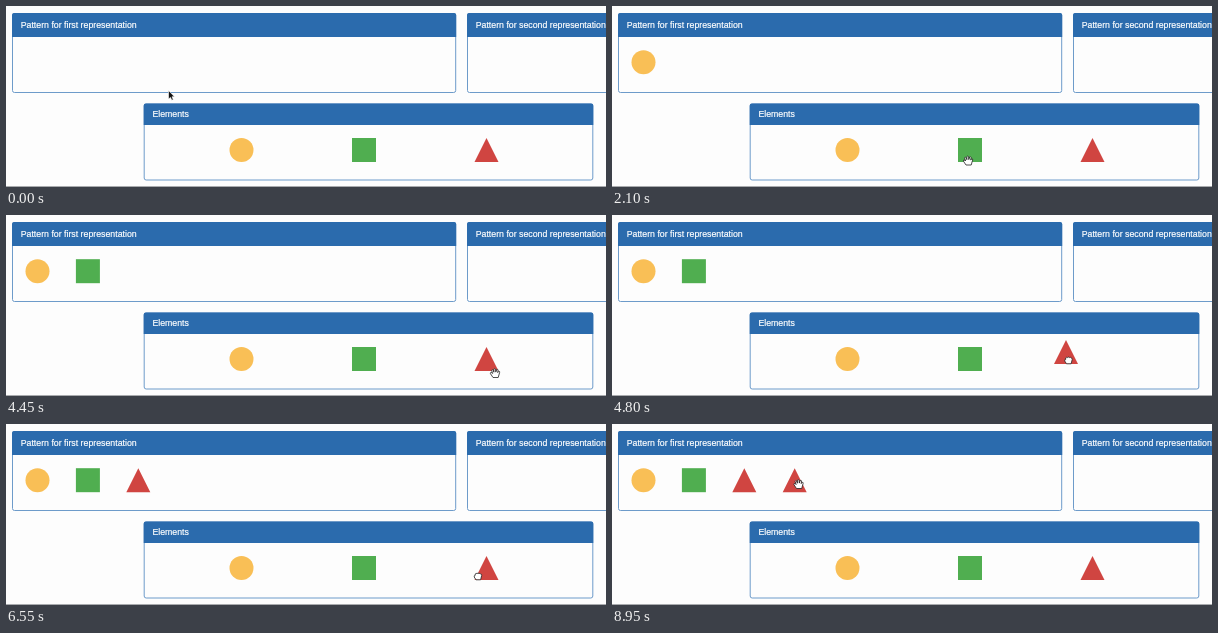
An HTML page that plays this animation: 600x181 px, repeating every 9000 ms.

```html
<!DOCTYPE html>
<html lang="en">
<head>
<meta charset="utf-8">
<title>Drag elements into a pattern</title>
<style>
  html, body { margin: 0; width: 100%; height: 100%; overflow: hidden; background: #fdfdfd; }
  svg { display: block; width: 100%; height: 100%; }
  text { font: 8.77px "Liberation Sans", Arial, sans-serif; fill: #fff; stroke: #fff; stroke-width: .2; }
  .body { fill: #fdfdfd; stroke: #6d9bca; }
  .body.over { fill: #89cee7; }
  .head { fill: #2b6bad; }
  .hand { fill: #fff; stroke: #222; stroke-width: .8; stroke-linejoin: round; }
</style>
</head>
<body>
<svg id="stage" viewBox="0 0 600 181">
  <defs>
    <circle id="circle" r="12" fill="#f9bf56"/>
    <rect id="square" x="-12" y="-12" width="24" height="24" fill="#50ae50"/>
    <path id="triangle" d="M0-12L12 12H-12Z" fill="#d04541"/>
    <path id="arrow" d="M0 0V8.6L2 6.9L3.3 9.8L4.8 9.1L3.5 6.3H6Z" fill="#111" stroke="#fff" stroke-width=".6"/>
    <path id="open" class="hand" d="M-2 4.5L-4.6.6Q-4.8-1-3.2-.3L-2.4.5L-3.4-2.7Q-2.8-4-1.9-2.9L-1.1-.8V-3.9Q-.2-5 .6-3.9L.8-.9L1.7-3.5Q2.7-4.2 3.1-3L2.7-.4L3.8-1.7Q5-1.8 4.6-.4L3.2 4.5Z"/>
    <path id="fist" class="hand" d="M-2 3.8L-3.8 1Q-4-.8-2.8-.6V-2Q-2-3.2-1-2.4Q0-3.5 1-2.4Q2-3.1 2.7-2Q3.9-1.9 3.7-.5L2.6 3.8Z"/>
  </defs>
  <rect y="180" width="600" height="1" fill="#a9abae"/>
</svg>
<script>
const LOOP = 9000, STEP = 50;
const CARRY = 800;   // time to bring a piece into the pattern
const SETTLE = 150;  // time from release until the highlight clears
const PATTERN_BOTTOM = 87;
const stage = document.getElementById("stage");

function add(tag, attrs) {
  const node = document.createElementNS("http://www.w3.org/2000/svg", tag);
  for (const name in attrs) node.setAttribute(name, attrs[name]);
  return stage.appendChild(node);
}

function addPanel(x, y, width, height, headHeight, title) {
  const body = add("rect", { class: "body", x: x + .5, y: y + .5, width: width - 1, height: height - 1, rx: 2 });
  const r = 2;
  add("path", {
    class: "head",
    d: `M${x} ${y + headHeight}v${r - headHeight}q0-${r} ${r}-${r}h${width - 2 * r}q${r} 0 ${r} ${r}v${headHeight - r}z`
  });
  add("text", { x: x + 8.7, y: y + headHeight / 2 + 3.1 }).textContent = title;
  return body;
}

function place(node, [x, y]) {
  node.setAttribute("transform", `translate(${x} ${y})`);
}

function addPiece(shape, position) {
  const node = add("use", { href: "#" + shape });
  place(node, position);
  return node;
}

const show = (node, visible) => node.setAttribute("visibility", visible ? "visible" : "hidden");

const firstPattern = addPanel(6, 7, 444.2, 80, 24, "Pattern for first representation");
addPanel(461, 7, 444.2, 80, 24, "Pattern for second representation");
addPanel(137.7, 97.5, 449.6, 77, 21.5, "Elements");

const homes = {};
["circle", "square", "triangle"].forEach((shape, i) => {
  const position = [235.5 + 122.5 * i, 144];
  homes[shape] = { position, node: addPiece(shape, position) };
});

// The pointer hovers a piece, grabs it, carries it to a point and drops it there.
const start = [162.5, 84.5];
const drags = [
  { shape: "circle", hoverAt: 300, hover: [235, 148], grabAt: 350, grab: [235, 148], dropAt: 1300, drop: [160, 62] },
  { shape: "square", hoverAt: 2100, hover: [356, 154.5], grabAt: 2500, grab: [345, 137], dropAt: 3750, drop: [151, 51] },
  { shape: "triangle", hoverAt: 4450, hover: [489, 158], grabAt: 4650, grab: [483, 152], dropAt: 5500, drop: [196, 76] },
  { shape: "triangle", hoverAt: 6250, hover: [472, 152], grabAt: 6550, grab: [472, 152], dropAt: 7700, drop: [186.5, 60] }
];
drags.forEach((drag, i) => {
  drag.slot = [31.5 + 50.4 * i, 56.2];
  drag.clearAt = drag.dropAt + SETTLE;
  drag.node = addPiece(drag.shape, drag.slot);
});
const pointer = add("use", {});

function glide(from, to, t, begin, end) {
  const u = Math.min(1, Math.max(0, (t - begin) / (end - begin)));
  const eased = u * u * (3 - 2 * u);
  return from.map((value, axis) => value + (to[axis] - value) * eased);
}

function pointerAt(t) {
  let from = start, leaveAt = 0;
  for (const { hoverAt, hover, grabAt, grab, drop, clearAt } of drags) {
    if (t < hoverAt) return glide(from, hover, t, leaveAt, hoverAt);
    if (t < grabAt) return glide(hover, grab, t, hoverAt, grabAt);
    if (t < clearAt) return glide(grab, drop, t, grabAt, grabAt + CARRY);
    from = drop;
    leaveAt = clearAt;
  }
  return from;
}

function render(t) {
  const tip = pointerAt(t);
  const isOver = ([x, y]) => Math.abs(tip[0] - x) <= 12 && Math.abs(tip[1] - y) <= 14;
  const active = drags.find(drag => t >= drag.grabAt && t < drag.clearAt);
  const dragging = active && t < active.dropAt;
  const dropped = drags.filter(drag => t >= drag.dropAt);
  const targets = [...Object.values(homes).map(home => home.position), ...dropped.map(drag => drag.slot)];

  for (const drag of drags) {
    show(drag.node, t >= drag.grabAt);
    place(drag.node, drag.slot);
  }
  for (const shape in homes) show(homes[shape].node, !active || active.shape !== shape);
  if (dragging) {
    place(active.node, homes[active.shape].position.map((home, axis) => home + tip[axis] - active.grab[axis]));
  }

  firstPattern.classList.toggle("over", Boolean(active) && tip[1] < PATTERN_BOTTOM);
  const look = dragging ? "fist" : targets.some(isOver) ? "open" : "arrow";
  pointer.setAttribute("href", "#" + look);
  place(pointer, tip);
}

function tick() {
  const t = performance.now() % LOOP;
  render(Math.floor(t / STEP) * STEP);
  requestAnimationFrame(tick);
}
tick();
</script>
</body>
</html>
```
